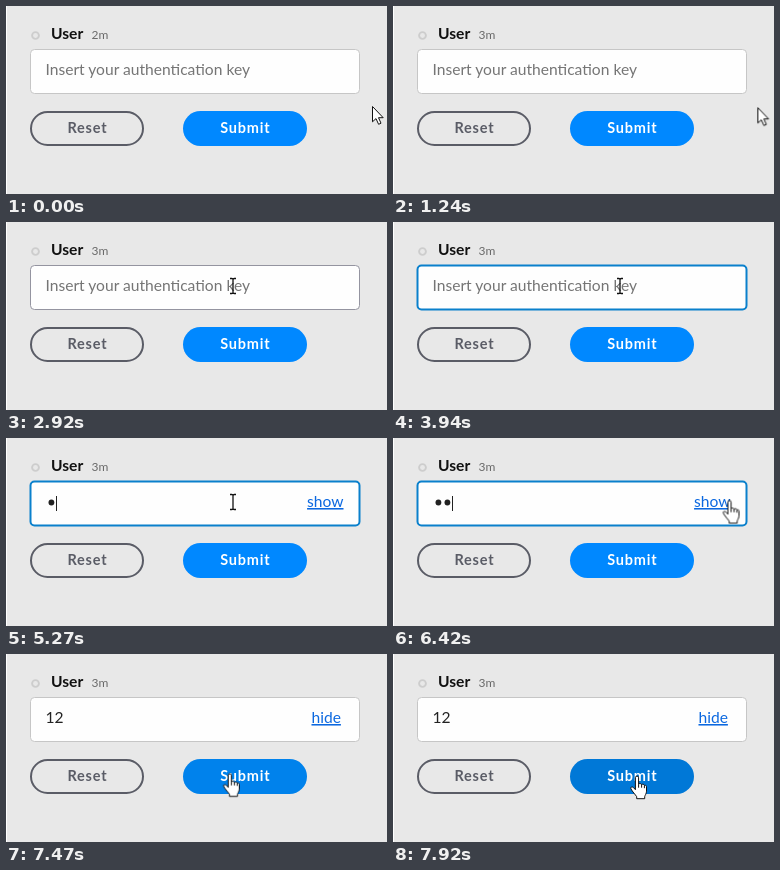
Recreate the animation shown at these times as an HTML page. Size 381 px wide and 188 px high, loop 8000 ms.

```html
<!DOCTYPE html>
<html lang="en">
<head>
<meta charset="utf-8">
<title>Authentication key form</title>
<style>
  html, body { margin: 0; width: 100%; height: 100%; overflow: hidden; background: #e8e8e8; }
  svg { display: block; width: 100vw; height: 100vh; font: 15.6px Lato, sans-serif; }

  .name { font-size: 15.6px; font-weight: 700; fill: #111; }
  .age { font-size: 12px; fill: #6a6a6a; }
  .hint { fill: #757575; }
  .value { fill: #222; }
  .link { fill: #0b68e0; text-anchor: middle; text-decoration: underline; }
  .label { font-size: 14.5px; font-weight: 700; letter-spacing: .8px; text-anchor: middle; }

  /* Discrete states switch hard; only the pointer position is eased. */
  .step, .step-all > * { animation: 8s step-end infinite; }
  .age.old { animation-name: age-old; }
  .age.new { animation-name: age-new; }
  .field { animation-name: field; }
  .hint { animation-name: hint; }
  .dot1 { animation-name: dot1; }
  .dot2 { animation-name: dot2; }
  .show { animation-name: dot1; }
  .reveal { animation-name: reveal; }
  .caret { animation-name: caret; }
  .submit { animation-name: submit; }
  .arrow { animation-name: arrow; }
  .beam { animation-name: beam; }
  .hand { animation-name: hand; }
  .pointer { animation: move 8s linear infinite; }

  @keyframes age-old { 0% { opacity: 1 } 15.25%, 100% { opacity: 0 } }
  @keyframes age-new { 0% { opacity: 0 } 15.25%, 100% { opacity: 1 } }
  @keyframes hint { 0% { opacity: 1 } 65.875%, 100% { opacity: 0 } }
  @keyframes dot1 { 0% { opacity: 0 } 65.875% { opacity: 1 } 82.125%, 100% { opacity: 0 } }
  @keyframes dot2 { 0% { opacity: 0 } 67.375% { opacity: 1 } 82.125%, 100% { opacity: 0 } }
  @keyframes reveal { 0% { opacity: 0 } 82.125%, 100% { opacity: 1 } }

  @keyframes field {
    0% { stroke: #c6c6c6; stroke-width: 1px }
    34.6% { stroke: #9494a0; stroke-width: 1px }
    43.125% { stroke: #0a80cc; stroke-width: 2px }
    80.625% { stroke: #9494a0; stroke-width: 1px }
    90.625%, 100% { stroke: #c6c6c6; stroke-width: 1px }
  }
  @keyframes caret {
    0% { opacity: 0; transform: translateX(41px) }
    43.125% { opacity: 1; transform: translateX(41px) }
    49.25% { opacity: 0; transform: translateX(41px) }
    55.875% { opacity: 1; transform: translateX(41px) }
    62.5% { opacity: 0; transform: translateX(41px) }
    65.875% { opacity: 1; transform: translateX(50px) }
    67.375% { opacity: 1; transform: translateX(59px) }
    74% { opacity: 0; transform: translateX(59px) }
    80.25% { opacity: 1; transform: translateX(59px) }
    80.625%, 100% { opacity: 0; transform: translateX(59px) }
  }
  @keyframes submit {
    0% { fill: #08f }
    91.6% { fill: #0082ec }
    99%, 100% { fill: #0078d7 }
  }

  @keyframes arrow {
    0% { opacity: 1 } 34.6% { opacity: 0 }
    90.625% { opacity: 1 } 91.6%, 100% { opacity: 0 }
  }
  @keyframes beam {
    0% { opacity: 0 } 34.6% { opacity: 1 } 77.8% { opacity: 0 }
    86.25% { opacity: 1 } 90.625%, 100% { opacity: 0 }
  }
  @keyframes hand {
    0% { opacity: 0 } 77.8% { opacity: 1 } 86.25% { opacity: 0 }
    91.6%, 100% { opacity: 1 }
  }
  @keyframes move {
    0%, 15% { transform: translate(366px, 100px) }
    16.25%, 31.6% { transform: translate(362px, 103px) }
    31.875%, 32.1% { transform: translate(360px, 103px) }
    33% { transform: translate(346px, 109px) }
    33.75% { transform: translate(318px, 104px) }
    34.6% { transform: translate(282px, 87px) }
    35.6% { transform: translate(244px, 70px) }
    36.5%, 76.1% { transform: translate(227px, 64px) }
    76.8% { transform: translate(250px, 62.5px) }
    77.8% { transform: translate(314px, 62px) }
    78.375%, 85.6% { transform: translate(336.5px, 62.5px) }
    86.25% { transform: translate(302px, 62px) }
    87.2% { transform: translate(222px, 62px) }
    88%, 88.4% { transform: translate(171px, 63px) }
    89.6% { transform: translate(166px, 74px) }
    90.625% { transform: translate(171px, 89px) }
    91.6% { transform: translate(186px, 106px) }
    93% { transform: translate(218px, 119px) }
    94.75%, 100% { transform: translate(244px, 122px) }
  }
</style>
</head>
<body>
<svg viewBox="0 0 381 188">
  <rect width="381" height="188" fill="#e8e8e8"/>
  <rect width="1" height="188" fill="#fff"/>

  <circle cx="29.5" cy="29.5" r="3.4" fill="none" stroke="#cdcdcd" stroke-width="1.9"/>
  <text class="name" x="45" y="33">User</text>
  <text class="age old step" x="85.5" y="33">2m</text>
  <text class="age new step" x="85.5" y="33">3m</text>

  <rect class="field step" x="24.5" y="43.5" width="329" height="44" rx="4" fill="#fefefe"/>
  <text class="hint step" x="39.5" y="69">Insert your authentication key</text>
  <g fill="#222">
    <circle class="dot1 step" cx="45.4" cy="64.5" r="2.9"/>
    <circle class="dot2 step" cx="54.4" cy="64.5" r="2.9"/>
    <rect class="caret step" y="58" width="1" height="15"/>
  </g>
  <text class="value reveal step" x="39.5" y="69">12</text>
  <text class="link show step" x="319.3" y="69">show</text>
  <text class="link reveal step" x="320.2" y="69">hide</text>

  <rect x="25" y="106" width="112" height="33" rx="16.5" fill="none" stroke="#5a5c66" stroke-width="2"/>
  <text class="label" x="81.4" y="127" fill="#5a5c66">Reset</text>
  <rect class="submit step" x="177" y="105" width="124" height="35" rx="17.5"/>
  <text class="label" x="239.3" y="127" fill="#fff">Submit</text>

  <g class="pointer">
    <g class="step-all" fill="#fff" stroke="#111" stroke-linejoin="round">
      <path class="arrow" d="M.5 .5V15.8L4 12.6L6.6 18.3L9 17.2L6.5 11.7H11.2Z"/>
      <path class="beam" fill="none" stroke-width="1.3"
        d="M-3 -7.5H-1.2Q0 -7.5 0 -6.3Q0 -7.5 1.2 -7.5H3M0 -6.5V6.5M-3 7.5H-1.2Q0 7.5 0 6.3Q0 7.5 1.2 7.5H3"/>
      <g class="hand">
        <path transform="translate(-7.1 -.8)"
          d="M5.5 14.5V2.5a1.6 1.6 0 0 1 3.2 0V9c.4-1 2.8-.9 3 .5c.6-.9 2.6-.6 2.8.7c.8-.6 2.1 0 2.1 1.3V16c0 2.5-1.5 4-1.8 5.5v2H6.8v-2C5.5 19.5 2.5 16.5 1 13.6c-.8-1.6 1.2-2.6 2.5-1.3zM8.7 9v3.5M11.7 9.5v3M14.5 10.2v2.8"/>
      </g>
    </g>
  </g>
</svg>
</body>
</html>
```
